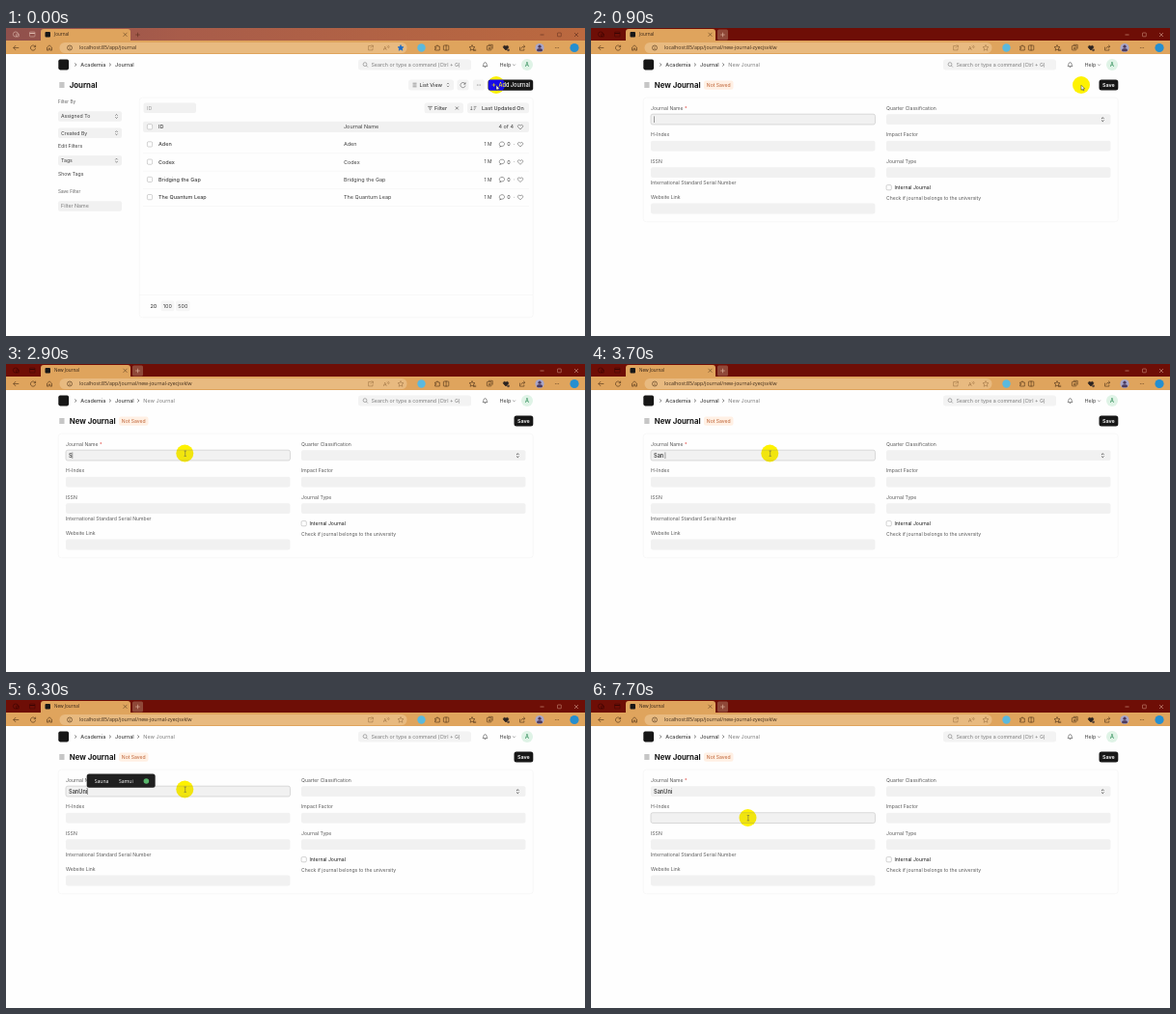
Write an HTML page with a canvas that moves like this. It is 600 px wide and 319 px high and loops after 8 s.

```html
<!DOCTYPE html>
<html lang="en">
<head>
<meta charset="utf-8">
<title>New Journal form</title>
<style>
html, body { margin: 0; width: 100%; height: 100%; overflow: hidden; background: #fefefe; }
canvas { display: block; width: 600px; height: 319px; }
</style>
</head>
<body>
<canvas id="stage"></canvas>
<script>
const LOOP = 8000, STEP = 100;
const INK = '#171717', BODY = '#404040', MUTED = '#7c7c7c', FIELD = '#f1f1f1', LINE = '#f1f1f1';
const UI = 'Inter, sans-serif', CHROME = '"Open Sans", sans-serif';

const canvas = document.getElementById('stage');
const ctx = canvas.getContext('2d');
const ratio = window.devicePixelRatio || 1;
canvas.width = 600 * ratio;
canvas.height = 319 * ratio;

// [time, value] lists: the last entry already reached is in force
const typed = [[0, ''], [2900, 'S'], [3500, 'San'], [3700, 'San '], [3900, 'San U'], [4000, 'San Un'],
  [4100, 'San Uni'], [4700, 'San'], [5600, 'SanU'], [5800, 'SanUn'], [5900, 'SanUni']];
const caretOn = [[0, 0], [900, 1], [1500, 0], [2000, 1], [2500, 0], [2900, 1], [4700, 0], [4800, 1],
  [5300, 0], [5600, 1], [6500, 0], [7200, 1], [7700, 0]];
const suggestions = [[0, null], [3300, ['Sun', 'Sure']], [3700, null], [4200, ['United', 'University']],
  [4700, null], [6000, ['Sauna', 'Samui']], [6700, null]];
const pointerPath = [[1300, 508, 59], [1400, 470, 61], [1500, 352, 69], [1600, 226, 82], [1700, 185, 85],
  [2200, 186, 92], [2300, 185.3, 92.5], [6400, 185.3, 92.5], [6600, 182, 105], [6900, 164, 121], [7100, 162.5, 122]];

const at = (track, t) => track.filter(k => k[0] <= t).pop()[1];

function pointerAt(t) {
  const next = pointerPath.findIndex(k => k[0] > t);
  if (next === 0) return pointerPath[0].slice(1);
  if (next < 0) return pointerPath[pointerPath.length - 1].slice(1);
  const [t0, x0, y0] = pointerPath[next - 1], [t1, x1, y1] = pointerPath[next];
  const k = (t - t0) / (t1 - t0);
  return [x0 + (x1 - x0) * k, y0 + (y1 - y0) * k];
}

function text(s, x, y, { size = 5.08, weight = 400, color = BODY, family = UI } = {}) {
  ctx.font = `${weight} ${size}px ${family}`;
  ctx.fillStyle = color;
  ctx.fillText(s, x, y + size * 0.36);
  return ctx.measureText(s).width;
}

function box(x, y, w, h, r, fill, stroke, width = 0.5) {
  ctx.beginPath();
  ctx.roundRect(x, y, w, h, r);
  if (fill) { ctx.fillStyle = fill; ctx.fill(); }
  if (stroke) { ctx.strokeStyle = stroke; ctx.lineWidth = width; ctx.stroke(); }
}

function disc(x, y, r, fill, stroke, width = 0.6) {
  ctx.beginPath();
  ctx.arc(x, y, r, 0, Math.PI * 2);
  if (fill) { ctx.fillStyle = fill; ctx.fill(); }
  if (stroke) { ctx.strokeStyle = stroke; ctx.lineWidth = width; ctx.stroke(); }
}

function path(d, x, y, color = BODY, width = 0.6, fill) {
  const p = new Path2D(d);
  ctx.save();
  ctx.translate(x, y);
  if (fill) { ctx.fillStyle = fill; ctx.fill(p); }
  ctx.strokeStyle = color;
  ctx.lineWidth = width;
  ctx.stroke(p);
  ctx.restore();
}

const STAR = 'M0-3L.9-.9 3-.8 1.4.6 1.9 2.8 0 1.6-1.9 2.8-1.4.6-3-.8-.9-.9Z';
const HEART = 'M0 2.5L-2.5 0C-3.4-1.6-1.2-3.2 0-1.3C1.2-3.2 3.4-1.6 2.5 0Z';
const CHAT = 'M-1.2 2C-3.6 1.5-3.3-2.5 0-2.5S3.5 2 0 2L-2.4 2.6Z';
const CROSS = 'M-2-2L2 2M2-2L-2 2';
const UPDOWN = 'M-1.2-.8L0-2 1.2-.8M-1.2.8L0 2 1.2.8';
const RELOAD = 'M2.4-1A2.6 2.6 0 1 0 2.6.6M2.6-2.8V-.8H.7';
const CHEVRON = 'M-.8-1.5L.8 0-.8 1.5';

function dots(x, y, color) {
  for (const dx of [-1.7, 0, 1.7]) disc(x + dx, y, 0.45, color);
}

function titleBarFill(active) {
  if (active) return '#6e0e06';
  const blend = ctx.createLinearGradient(0, 0, 600, 0);
  blend.addColorStop(0, '#8f504c');
  blend.addColorStop(0.3, '#a85c4a');
  blend.addColorStop(1, '#bb693f');
  return blend;
}

function drawBrowser(active, title, url, starred) {
  const bar = '#dfa45d', glyph = '#4b3016', faint = '#93693a';
  const controls = active ? '#d9a08c' : '#5a2a1c';
  ctx.fillStyle = titleBarFill(active);
  ctx.fillRect(0, 0, 600, 14);
  const left = active ? '#3a0503' : '#dcb9ae';
  disc(10, 6.5, 2.6, null, left);
  box(10.5, 6, 3, 3, 0.6, null, left);
  box(24.5, 4, 5.5, 5, 0.8, null, left);
  path('M-2.7-1H2.7', 27.2, 6.5, left, 1);

  box(36, 1, 93, 15, [3, 3, 0, 0], bar);
  box(40.5, 4, 5.5, 5.5, 1, INK);
  text(title, 50, 6.8, { size: 4.6, family: CHROME, color: '#302015' });
  path(CROSS, 123.5, 6.8, glyph, 0.5);
  if (active) box(131, 1.5, 11, 11, 1.5, '#8f4838');
  path('M-2.3 0H2.3M0-2.3V2.3', 136.5, 7, active ? '#e3bba6' : '#5b2e1e');
  path('M-2 0H2', 555.5, 7, controls);
  box(571.5, 5, 3.8, 3.8, 0.4, null, controls);
  path(CROSS, 591, 7, controls);

  ctx.fillStyle = bar;
  ctx.fillRect(0, 13, 600, 14);
  path('M2.8 0H-2.8M-.3-2.5L-2.8 0-.3 2.5', 10.5, 20.5, glyph);
  path(RELOAD, 28, 20.5, glyph);
  path('M-2.5 2.6V-.4L0-2.7 2.5-.4V2.6H.8V.6H-.8V2.6Z', 45, 20.5, glyph);
  box(55.5, 15, 360, 11, 5.5, '#e8ba80');
  disc(66, 20.5, 2.5, null, glyph);
  path('M0-.2V1.5M0-1.4V-.9', 66, 20.5, glyph);
  text(url, 76, 20.4, { size: 5.2, family: CHROME, color: '#3d2a19' });

  path('M0-2H-2.4V2.4H2V.6M0-2.4H2.4V0M2.4-2.4L-.3.3', 378, 20.5, faint, 0.5);
  text('A', 391, 20.8, { size: 5.5, family: CHROME, color: faint });
  path('M0-1Q1 0 0 1M1.3-1.6Q2.8 0 1.3 1.6', 395, 19.5, faint, 0.5);
  if (starred) path(STAR, 409, 20.5, '#1769c8', 0.6, '#1769c8');
  else path(STAR, 409, 20.5, faint, 0.5);
  disc(430.5, 20.5, 4.2, '#5ab9de');
  path('M-2.4-1.5H-.7C-1-3.2 1-3.2.8-1.5H2.3V2.5H-2.4V.9C-.5 1.2-.5-.6-2.4-.2Z', 447, 20.5, glyph);
  box(453.3 + 0.1, 18, 5.4, 5, 0.7, null, glyph, 0.6);
  path('M0-3V3', 456.1, 20.5, glyph);
  ctx.fillStyle = faint;
  path(STAR, 483, 20.5, glyph, 0.6);
  path('M1.5 1.8H4.2M1.5 3H4.2', 483, 20.5, glyph, 0.5);
  box(498.4, 18.4, 4.6, 4.5, 0.7, null, glyph, 0.6);
  path('M-1.2-3.2H3.2V1M0-.7V1.7M-1.2.5H1.2', 501, 20.5, glyph);
  path(HEART, 518, 20.5, '#2a2320', 0.6, '#2a2320');
  disc(520.5, 22.8, 1.4, '#5b4637');
  path('M-2.5-.8V2.6H1.8V1M-1 1C-1-1 .5-1.3 2.6-1.3M1.2-2.8L2.8-1.3 1.2.2', 535, 20.5, glyph);
  disc(553, 20.5, 4.6, '#a9a6c9');
  disc(553, 19.2, 1.6, '#4c3b5e');
  box(550, 21.2, 6, 3, [2.5, 2.5, 1.5, 1.5], '#4c3b5e');
  dots(571, 20.5, glyph);
  disc(589, 20.5, 4.6, '#258fd0');
}

function drawNavbar(crumbs) {
  box(54.3, 32.6, 10.8, 10.8, 1.8, INK);
  crumbs.forEach(([label, x], i) => {
    path(CHEVRON, x - 5.2, 38, BODY, 0.7);
    text(label, x, 37.9, { size: 5.47, color: i === 2 ? MUTED : BODY, weight: i === 2 ? 400 : 500 });
  });
  box(365, 32.5, 117, 11, 2.5, '#f3f3f3');
  disc(372, 37.6, 1.9, null, MUTED);
  path('M0 0L1.5 1.5', 373.4, 39, MUTED);
  text('Search or type a command (Ctrl + G)', 378.4, 38, { size: 5.3, color: MUTED });
  path('M-2.4 1.6C-1.5.8-1.9-2.4 0-2.4S1.5.8 2.4 1.6ZM-.7 2.6H.7', 496.5, 38, BODY);
  text('Help', 511.5, 38, { size: 5.47 });
  path('M-1.3-.6L0 .7 1.3-.6', 526.5, 38.2, BODY, 0.5);
  disc(540, 38, 6, '#dff3e6');
  text('A', 538, 38, { size: 5.5, color: '#2c8a55', weight: 500 });
}

function drawHeading(title) {
  path('M0-2H5.2M0 0H5.2M0 2H5.2', 55.3, 59, BODY, 0.6);
  text(title, 65.7, 59.2, { size: 7.8, weight: 700, color: INK });
}

function select(label, y) {
  box(54, y - 5.2, 66, 10.4, 2, FIELD);
  text(label, 57, y, { size: 5.2 });
  path(UPDOWN, 114.5, y, BODY, 0.6);
}

const checkbox = (x, y) => box(x - 2.6, y - 2.6, 5.2, 5.2, 1.2, '#fff', '#a5a5a5', 0.5);

function rule(x0, x1, y) {
  ctx.fillStyle = LINE;
  ctx.fillRect(x0, y, x1 - x0, 0.5);
}

function drawList() {
  const mid = { size: 5.47, weight: 500 };
  drawHeading('Journal');
  box(417, 53.5, 47, 11, 2.5, '#f3f3f3');
  path('M0-1.8H4M0 0H4M0 1.8H4', 421.5, 59, BODY, 0.5);
  text('List View', 428.5, 59, mid);
  path(UPDOWN, 458, 59, BODY, 0.5);
  box(467.5, 53.5, 12, 11, 2.5, '#f3f3f3');
  path(RELOAD, 473.5, 59, BODY, 0.5);
  box(484, 53.5, 12, 11, 2.5, '#f3f3f3');
  dots(490, 59, BODY);
  box(499.5, 53.5, 46.7, 11.2, 2.5, INK);
  path('M-1.8 0H1.8M0-1.8V1.8', 505.5, 59, '#fff', 0.6);
  text('Add Journal', 510.5, 59, { size: 5.6, weight: 500, color: '#fff' });

  text('Filter By', 54, 76.2, { size: 4.7, color: '#616161' });
  select('Assigned To', 91.5);
  select('Created By', 108.7);
  text('Edit Filters', 54, 121.9);
  select('Tags', 137.2);
  text('Show Tags', 54, 150.7);
  text('Save Filter', 54, 169.6, { size: 4.7, color: '#616161' });
  box(54, 179.2, 66, 10.5, 2, FIELD);
  text('Filter Name', 57, 184.5, { size: 5.3, color: MUTED });

  box(138.2, 72.2, 408, 227.5, 3, null, LINE);
  box(142.5, 77.5, 54.5, 10.5, 2, FIELD);
  text('ID', 146, 82.8, { size: 5.2, color: '#999' });
  box(433.5, 77.5, 40.5, 10.7, 2.5, '#f3f3f3');
  path('M-2.4-1.6H2.4M-1.5 0H1.5M-.6 1.6H.6', 439.5, 83, BODY);
  text('Filter', 444, 83, mid);
  path('M-1.5-1.5L1.5 1.5M1.5-1.5L-1.5 1.5', 467.3, 83, BODY);
  box(478, 77.5, 64, 10.7, 2.5, '#f3f3f3');
  path('M-2.2-2V2M-3.2 1L-2.2 2-1.2 1M.2-1.6H3M.2 0H2.4M.2 1.6H1.5', 484.5, 83, BODY, 0.5);
  text('Last Updated On', 493, 83, mid);

  box(142, 96.8, 400, 11.2, 2, '#f1f1f1');
  checkbox(149, 102.3);
  text('ID', 158, 102.3, mid);
  text('Journal Name', 350, 102.3, { size: 5.47 });
  text('4 of 4', 510.5, 102.3, { size: 5.47 });
  path(HEART, 533, 102.5, BODY, 0.5);
  ['Aden', 'Codex', 'Bridging the Gap', 'The Quantum Leap'].forEach((name, i) => {
    const y = 120.4 + i * 18.25;
    checkbox(149, y);
    text(name, 158, y, mid);
    text(name, 350, y, { size: 5.47 });
    text('1 M', 495.5, y, { size: 5 });
    path(CHAT, 514, y, BODY, 0.5);
    text('0', 519.2, y, { size: 5.47 });
    disc(526.7, y, 0.45, MUTED);
    path(HEART, 533, y + 0.2, BODY, 0.5);
    rule(142, 542, y + 9.2);
  });
  rule(138, 546, 276);
  box(160.5, 282.5, 14, 10.8, 2, '#f6f6f6');
  box(176, 282.5, 14.5, 10.8, 2, '#f6f6f6');
  text('20', 149.5, 288, mid);
  text('100', 162.8, 288, { size: 5.47 });
  text('500', 178.2, 288, { size: 5.47 });
}

function field(label, x, y, focused) {
  text(label, x, y - 11.6, { color: '#5b5b5b' });
  box(x, y - 5.4, 232.5, 10.8, 2, FIELD, focused ? '#c4c4c4' : null, 0.6);
}

function caret(x, y) {
  ctx.fillStyle = '#444';
  ctx.fillRect(x, y - 3.3, 0.5, 6.6);
}

function drawSuggestions(words, x) {
  ctx.font = `400 5.1px ${CHROME}`;
  const starts = [];
  let end = x + 8;
  for (const word of words) {
    starts.push(end);
    end += ctx.measureText(word).width + 10.5;
  }
  box(x, 76.5, end + 12.5 - x, 14.3, 2.5, '#202020');
  words.forEach((word, i) => text(word, starts[i], 84, { size: 5.1, family: CHROME, color: '#fff' }));
  disc(end + 3.2, 84, 2.8, '#58b66b');
}

function drawForm(t) {
  const focus = t < 900 ? '' : t < 7000 ? 'name' : 'index';
  drawHeading('New Journal');
  box(117, 54.5, 30.5, 9.3, 2.2, '#fff0e4');
  text('Not Saved', 119.8, 59, { color: '#bd6033' });
  box(526.5, 53.4, 19.8, 11.2, 2.5, INK);
  text('Save', 530, 59, { size: 5.4, weight: 600, color: '#fff' });

  box(54.2, 72.2, 492, 128.5, 3, null, LINE);
  field('Journal Name', 62, 94.6, focus === 'name');
  text('*', 97, 83.2, { color: '#e0443e' });
  field('H-Index', 62, 122.1, focus === 'index');
  field('ISSN', 62, 149.7);
  text('International Standard Serial Number', 62, 160.6, { color: '#5b5b5b' });
  field('Website Link', 62, 187);
  field('Quarter Classification', 306, 94.6);
  path(UPDOWN, 530.3, 94.7, INK, 0.7);
  field('Impact Factor', 306, 122.1);
  field('Journal Type', 306, 149.7);
  checkbox(308.7, 165.2);
  text('Internal Journal', 314.5, 165.1, { color: INK });
  text('Check if journal belongs to the university', 306, 175.8, { color: '#5b5b5b' });

  const caretX = 65 + text(at(typed, t), 65, 94.7, { size: 5.6, weight: 600 });
  const words = at(suggestions, t);
  if (at(caretOn, t)) focus === 'index' ? caret(65, 122.2) : caret(caretX, 94.7);
  if (words) drawSuggestions(words, caretX - 0.6);
}

function drawPointer(t) {
  const [x, y] = pointerAt(t);
  const overField = t >= 700 && x < 295 && ((y > 89 && y < 100) || (y > 116.7 && y < 128));
  // inverting spot: yellow on white, blue on black
  ctx.globalCompositeOperation = 'difference';
  disc(x, y, 9, '#000cff');
  ctx.globalCompositeOperation = 'source-over';
  if (overField) path('M-1.2-2.7H1.2M0-2.7V2.7M-1.2 2.7H1.2', x + 0.4, y + 0.2, '#555', 0.5);
  else path('M0 0V5L1.2 3.9 2 5.7 2.8 5.3 2 3.6H3.6Z', x, y + 0.3, '#222', 0.5, '#fff');
}

function render(now) {
  const t = Math.floor((now % LOOP) / STEP) * STEP;
  const form = t >= 700;
  ctx.setTransform(ratio, 0, 0, ratio, 0, 0);
  ctx.fillStyle = '#fefefe';
  ctx.fillRect(0, 0, 600, 319);
  drawBrowser(t >= 500, t >= 1000 ? 'New Journal' : 'Journal',
    'localhost:85/app/journal' + (form ? '/new-journal-zyecjsvklw' : ''), !form);
  const crumbs = [['Academia', 77.3], ['Journal', 113]];
  drawNavbar(form ? [...crumbs, ['New Journal', 142.3]] : crumbs);
  form ? drawForm(t) : drawList();
  drawPointer(t);
}

const start = performance.now();
function tick() {
  render(performance.now() - start);
  requestAnimationFrame(tick);
}
tick();
</script>
</body>
</html>
```
